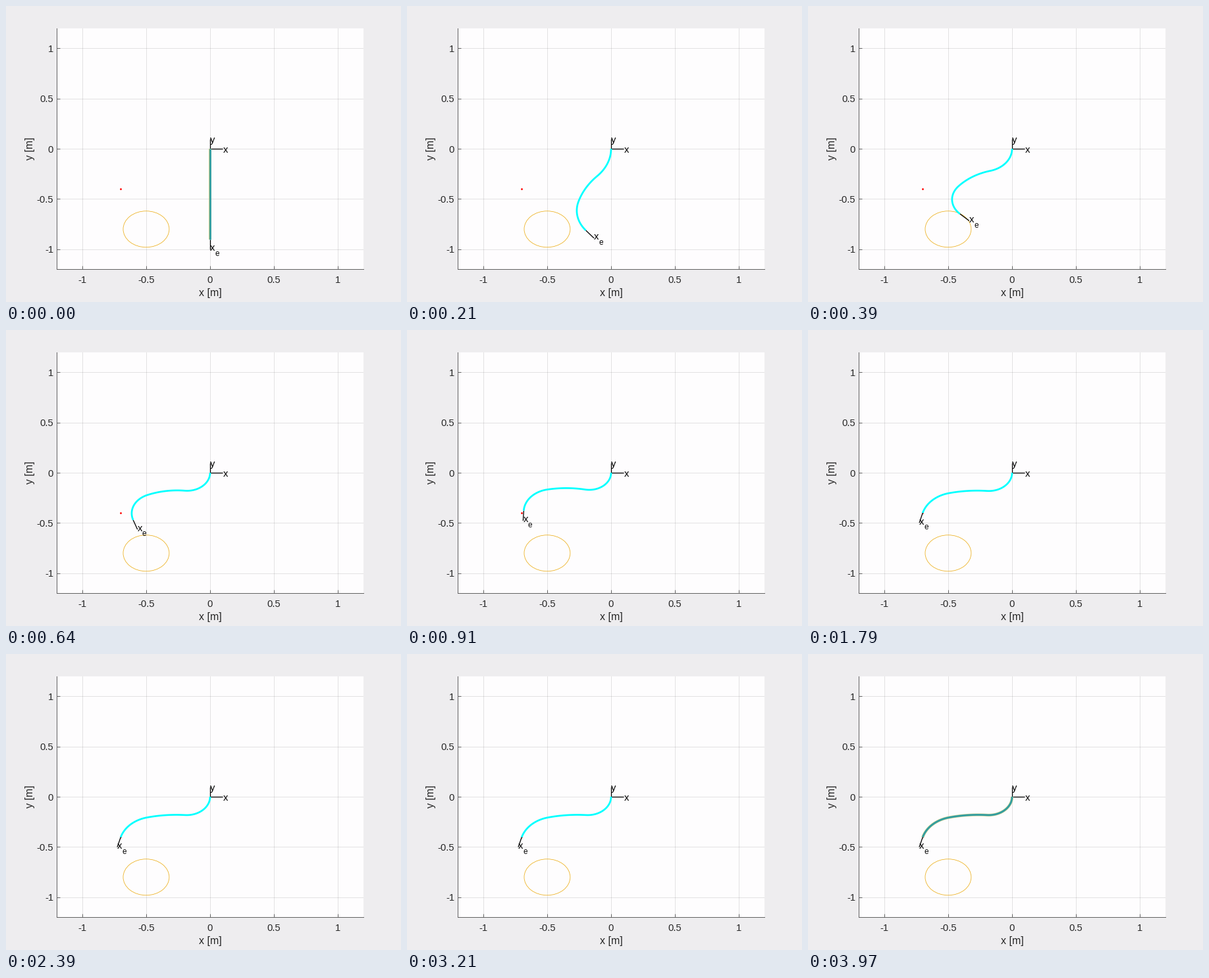
A matplotlib script for the animation above (4 s loop, 600 px wide and 450 px high).

```python
import numpy as np
import matplotlib.pyplot as plt
from matplotlib.animation import FuncAnimation
from matplotlib.patches import Circle

W, H, DPI = 600, 450, 100
LEFT, TOP, RIGHT, BOTTOM = 77, 33.5, 543, 400.4
LIM = 1.2
SX, SY = (RIGHT - LEFT) / (2 * LIM), (BOTTOM - TOP) / (2 * LIM)
PX = 72 / DPI
INK, AXIS, CYAN, TEAL = "#262626", "#626262", "#00ffff", "#2f9da2"
SEG = 0.3
STEPS, TICK, LOOP = 100, 10, 4000

plt.rcParams["font.family"] = "Liberation Sans"

# Pose keys: step, then the bend of each segment in radians
KEYS = np.array([
    [0, 0, 0, 0],
    [2, -0.20, 0.14, 0.27],
    [5, -0.76, 0.48, 0.97],
    [10, -1.32, 0.61, 1.52],
    [14, -1.59, 0.53, 1.56],
    [18, -1.72, 0.45, 1.47],
    [23, -1.76, 0.38, 1.33],
    [28, -1.72, 0.34, 1.205],
    [35, -1.675, 0.32, 1.11],
    [45, -1.65, 0.307, 1.08],
    [60, -1.64, 0.30, 1.07],
    [99, -1.64, 0.30, 1.07],
])
KT, KV = KEYS[:, 0], KEYS[:, 1:]
SLOPES = np.gradient(KV, KT, axis=0)
SLOPES[0] = SLOPES[-2:] = 0

# Steps snap to a clock of 33 ticks per second, rounded to 10 ms
STARTS = np.round(np.round(np.arange(STEPS) * 1.32) * 100 / 33) * 10


def bends(step):
    i = min(np.searchsorted(KT, step, side="right") - 1, len(KT) - 2)
    h = KT[i + 1] - KT[i]
    u = (step - KT[i]) / h
    return ((1 + 2 * u) * (1 - u) ** 2 * KV[i]
            + u * (1 - u) ** 2 * h * SLOPES[i]
            + u * u * (3 - 2 * u) * KV[i + 1]
            + u * u * (u - 1) * h * SLOPES[i + 1])


def arm_shape(step, n=24):
    """Points along three arcs of constant curvature, and the end heading."""
    ds = SEG / n
    turn = np.repeat(bends(step) / n, n)
    end = np.cumsum(turn) - np.pi / 2
    mid = end - turn / 2
    x = np.concatenate([[0], np.cumsum(ds * np.cos(mid))])
    y = np.concatenate([[0], np.cumsum(ds * np.sin(mid))])
    return x, y, end[-1]


fig = plt.figure(figsize=(W / DPI, H / DPI), dpi=DPI, facecolor="#eeedef")
ax = fig.add_axes([LEFT / W, 1 - BOTTOM / H, (RIGHT - LEFT) / W, (BOTTOM - TOP) / H],
                  facecolor="#fefdfe")
ax.set(xlim=(-LIM, LIM), ylim=(-LIM, LIM))
ticks = [-1, -0.5, 0, 0.5, 1]
ax.set_xticks(ticks, [])
ax.set_yticks(ticks, [])
ax.tick_params(direction="in", length=4.6 * PX, width=PX, color=AXIS)
ax.grid(color=INK, alpha=0.12, lw=PX)
ax.set_axisbelow(True)
for side in ("top", "right"):
    ax.spines[side].set_visible(False)
for side in ("left", "bottom"):
    ax.spines[side].set(color=AXIS, linewidth=PX)


def label(x, y, s, size=14.7, ha="center", rot=0):
    fig.text(x / W, 1 - y / H, s, size=size * PX, color=INK, ha=ha, va="baseline",
             rotation=rot, rotation_mode="anchor")


def mark(s, x, y, size=14.7):
    return ax.text(x, y, s, size=size * PX, color="black", ha="left",
                   va="baseline", zorder=6)


def line(x, y, color, width, z):
    return ax.plot(x, y, color=color, lw=width * PX, zorder=z,
                   solid_capstyle="butt")[0]


mid_x, mid_y = (LEFT + RIGHT) / 2, (TOP + BOTTOM) / 2
for v in ticks:
    label(mid_x + v * SX, 421, f"{v:g}")
    label(72, mid_y - v * SY + 5.6, f"{v:g}", ha="right")
label(mid_x, 441.5, "x [m]", 16)
label(40.5, mid_y, "y [m]", 16, rot=90)

ax.add_patch(Circle((-0.5, -0.8), 0.18, fill=False, ec="#edb120",
                    lw=0.8 * PX, zorder=3))
ax.plot(-0.7, -0.4, "o", color="red", ms=2.8 * PX, mew=0, zorder=3)
line([0, 0.1], [0, 0], "black", 1.3, 4)
line([0, 0], [0, 0.1], "black", 1.3, 4)
mark("x", 0.1, -5.6 / SY)
mark("y", 0, 0.1 - 5.9 / SY)

fringe = line([], [], "#c4c988", 4, 4.5)
arm = line([], [], CYAN, 2.7, 5)
tip = line([], [], "black", 1.3, 4)
tip_x = mark("x", 0, 0)
tip_e = mark("e", 0, 0, 11.7)


def draw(n):
    step = np.searchsorted(STARTS, n * TICK, side="right") - 1
    x, y, heading = arm_shape(step)
    dull = step in (0, STEPS - 1)
    arm.set_data(x, y)
    arm.set_color(TEAL if dull else CYAN)
    fringe.set_data(x, y)
    fringe.set_visible(dull)
    ex, ey = x[-1] + 0.1 * np.cos(heading), y[-1] + 0.1 * np.sin(heading)
    tip.set_data([x[-1], ex], [y[-1], ey])
    tip_x.set_position((ex, ey - 2.5 / SY))
    tip_e.set_position((ex + 7.2 / SX, ey - 10 / SY))
    return fringe, arm, tip, tip_x, tip_e


anim = FuncAnimation(fig, draw, frames=LOOP // TICK, interval=TICK,
                     repeat=True, repeat_delay=0, cache_frame_data=False)
plt.show()
```
